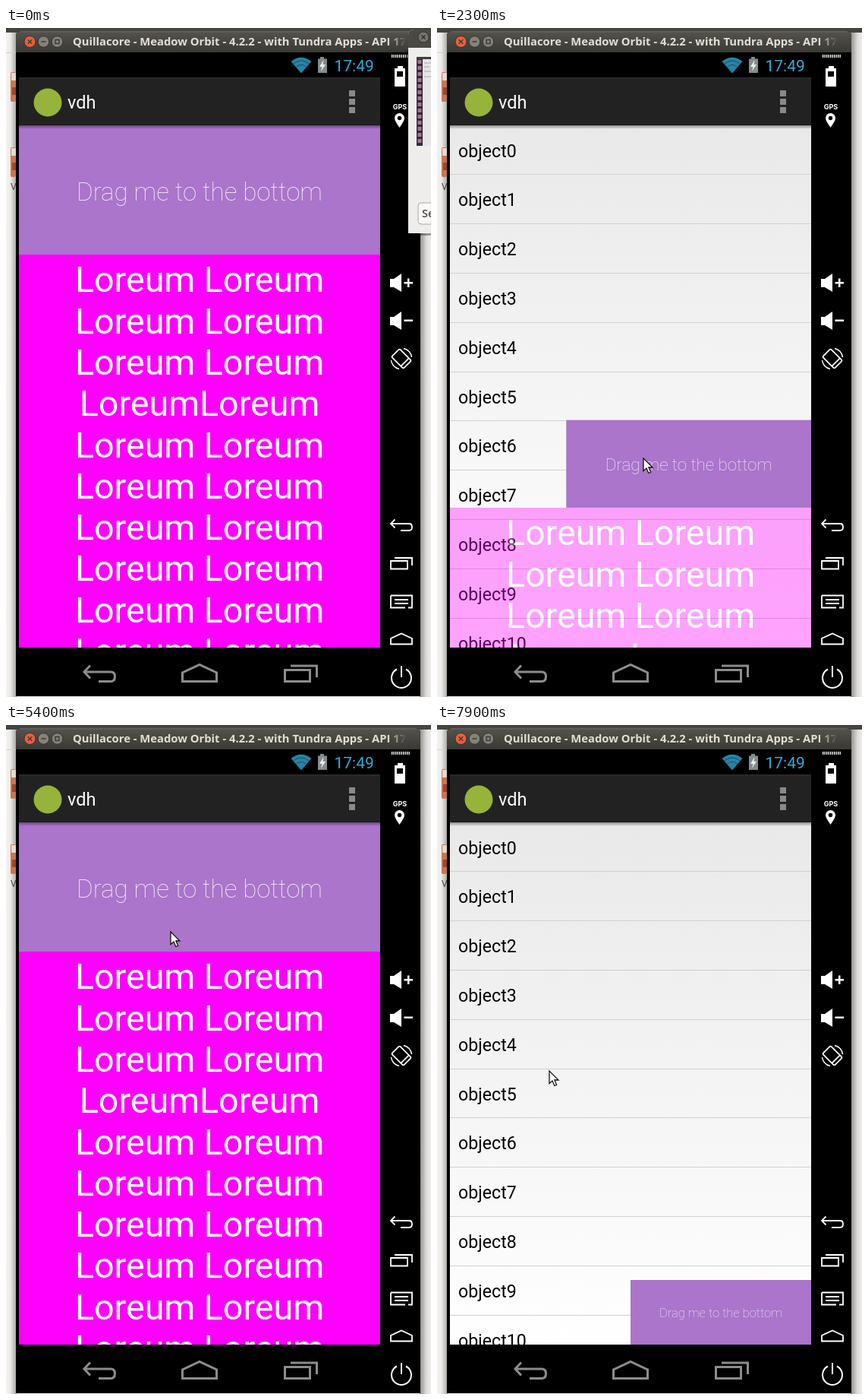
Recreate the animation shown at these times as an HTML page. Size 560 px wide and 880 px high, loop 8 s.

```html
<!DOCTYPE html>
<html lang="en">
<head>
<meta charset="utf-8">
<title>Drag panel demo</title>
<style>
  html, body { margin: 0; width: 100%; height: 100%; overflow: hidden; background: #f2f1ef; }
  svg { display: block; width: 560px; height: 880px; }
  text { font-family: Roboto, "Noto Sans", sans-serif; }
  .title { font: 700 14.8px "Open Sans", "Noto Sans", sans-serif; }
  .button { font: 600 14.5px "Open Sans", "Noto Sans", sans-serif; fill: #4c4c4c; }
  .gps { font: 700 9px Inter, "Liberation Sans", sans-serif; fill: #fff; text-anchor: middle; }
  .row { font-size: 23.2px; fill: #050505; }
  .lorem { font-size: 46.6px; fill: #fff; text-anchor: middle; }
  .drag { font-size: 33.1px; font-weight: 100; fill: #f7effb; text-anchor: middle; }
  .side { fill: none; stroke: #fff; stroke-width: 1.8; }
  .nav { fill: none; stroke: #8c8c8c; stroke-width: 3; }
</style>
</head>
<body>
<svg viewBox="0 0 560 880">
  <defs>
    <linearGradient id="bar" x2="0" y2="1"><stop stop-color="#55534d"/><stop offset="1" stop-color="#3a3934"/></linearGradient>
    <linearGradient id="sheet" x2="0" y2="1"><stop stop-color="#e9e9e9"/><stop offset=".5" stop-color="#f4f4f4"/><stop offset="1" stop-color="#fff"/></linearGradient>
    <linearGradient id="drop" x2="0" y2="1"><stop stop-opacity=".4"/><stop offset="1" stop-opacity="0"/></linearGradient>
    <linearGradient id="left"><stop stop-color="#f4f3f1"/><stop offset=".4" stop-color="#ecebe9"/><stop offset="1" stop-color="#a5a4a1"/></linearGradient>
    <linearGradient id="right"><stop stop-color="#8f8e8b"/><stop offset=".6" stop-color="#dddcda"/><stop offset="1" stop-color="#efeeec"/></linearGradient>
    <linearGradient id="fade" gradientUnits="userSpaceOnUse" x1="503" x2="527"><stop stop-color="#e2ded6"/><stop offset="1" stop-color="#e2ded6" stop-opacity="0"/></linearGradient>
    <clipPath id="screen"><path d="M17 128H493V815H17Z"/></clipPath>
  </defs>

  <!-- desktop -->
  <rect width="14" height="880" fill="url(#left)"/>
  <rect x="545" width="15" height="880" fill="url(#right)"/>
  <rect width="560" height="6" fill="#45443f"/>
  <path d="M0 32.5H13" stroke="#d0cecb"/>
  <g id="files"></g>
  <text x="6" y="213" font-size="12" fill="#444">V</text>

  <!-- emulator window -->
  <path d="M13 879V11Q13 4 20 4H539Q546 4 546 11V879Z"/>
  <path d="M13 32V11Q13 4 20 4H539Q546 4 546 11V32Z" fill="url(#bar)"/>
  <path d="M18 5H541" stroke="#6b6963"/>
  <circle cx="31.5" cy="18" r="7.5" fill="#e8603c" stroke="#33322e"/>
  <g fill="#85827a" stroke="#33322e"><circle cx="49.5" cy="18" r="7.3"/><circle cx="67.5" cy="18" r="7.3"/></g>
  <path d="M28.7 15.2L34.3 20.8M34.3 15.2L28.7 20.8M46.5 18H52.5M65 15.5H70V20.5H65Z" fill="none" stroke="#3a3934" stroke-width="1.4"/>
  <text class="title" x="88" y="23" fill="url(#fade)">Quillacore - Meadow Orbit - 4.2.2 - with Tundra Apps - API 17</text>

  <!-- status bar -->
  <path d="M375.5 44Q389 33.5 402.5 44L389 59.5Z" fill="#2783a6"/>
  <path d="M379 47Q389 39 399 47M382.5 51Q389 46 395.5 51" fill="none" stroke="#125168"/>
  <path d="M414 38H419V40.5H423V59H411V40.5H414Z" fill="#858b8d"/>
  <path d="M418.5 42L413 51H416.5L415 57L421 48H417.5Z" fill="#e9eeee"/>
  <text x="432.5" y="56.5" font-size="21" fill="#36a9d4">17:49</text>

  <!-- device controls -->
  <path d="M508 37H532" stroke="#fff" stroke-width="4" stroke-dasharray="1.3 1.2"/>
  <path d="M516 50H523V53H526V77H512V53H516Z" fill="#fff"/>
  <path d="M515 57H523V64H515Z"/>
  <text class="gps" x="519" y="107">GPS</text>
  <path d="M518.5 131Q512 122 512 118.5A6.5 6.5 0 0 1 525 118.5Q525 122 518.5 131Z" fill="#fff"/>
  <circle cx="518.5" cy="118.5" r="2.7"/>
  <g fill="#fff">
    <path id="spk" d="M506 330H511L521 323V347L511 341H506Z"/>
    <use href="#spk" y="50"/>
    <path d="M524.5 334H529V329.5H531.5V334H536V336.5H531.5V341H529V336.5H524.5ZM524.5 383.5H536V386H524.5Z"/>
  </g>
  <g class="side">
    <g transform="rotate(-45 521 435)"><rect x="513.5" y="424" width="15" height="22" rx="2"/><path d="M513.5 441.5H528.5"/></g>
    <path d="M524 421.5A13.5 13.5 0 0 1 534.5 433M518 448.5A13.5 13.5 0 0 1 507.500 437" stroke-width="1.5"/>
    <path d="M512.5 646.5L507 652L512.5 657.5M507 652H531Q535 652 535 656.5Q535 661 531 661H520"/>
    <path d="M507 701H529V711.5H507ZM512 697H535V707"/>
    <path d="M507 746.5H535V762.5H530M507 746.5V762.5H526M512 752H530M512 757H530"/>
    <path d="M507 810.5V803L521 796.5L535 803V810.5Z"/>
    <path d="M515 843.5A13 13 0 1 0 527 843.5M521 839V854" stroke-width="2"/>
  </g>

  <!-- app bar -->
  <path d="M17 65H493V128H17Z" fill="#222"/>
  <path d="M17 66H493" stroke="#303030"/>
  <path d="M17 127.5H493" stroke="#151515"/>
  <circle cx="55" cy="98" r="18.5" fill="#96b43a"/>
  <text x="81" y="106" font-size="23.6" fill="#fff">vdh</text>
  <path d="M452 82H460V90H452ZM452 93H460V101H452ZM452 104H460V112H452Z" fill="#898989"/>

  <!-- app content -->
  <g clip-path="url(#screen)">
    <rect x="17" y="128" width="476" height="687" fill="url(#sheet)"/>
    <g id="rows"></g>
    <g id="header">
      <rect x="-476" y="-170" width="476" height="170" fill="#aa75ca"/>
      <text class="drag" x="-238" y="-71.5">Drag me to the bottom</text>
    </g>
    <g id="desc">
      <rect x="17" width="476" height="687" fill="#f0f"/>
    </g>
    <rect x="17" y="128" width="476" height="5" fill="url(#drop)"/>
  </g>

  <!-- navigation bar -->
  <g class="nav">
    <path d="M111 838.5L103 847L111 855.5M103 847H138Q143.5 847 143.5 853Q143.5 859.5 138 859.5H122"/>
    <path d="M232.5 859.5V848L255 837.5L277.5 848V859.5Z"/>
    <path d="M367.5 844.5H400.5V859.5H367.5ZM375 839H409.5V854"/>
  </g>

  <!-- dialog at the edge -->
  <g id="dialog">
    <path d="M527 30H530V273H560V270H530" fill="#000" opacity=".35"/>
    <path d="M530 270V10Q530 2 538 2H560V270Z" fill="#eeedeb"/>
    <path d="M530 26V10Q530 2 538 2H560V26Z" fill="#4a4944"/>
    <circle cx="550" cy="12" r="7" fill="#77746d" stroke="#33322e"/>
    <path d="M547.5 9.5L552.5 14.5M552.5 9.5L547.5 14.5" stroke="#33322e" stroke-width="1.4"/>
    <path d="M541 38H560V155H541Z" fill="#e6e4e6"/>
    <path d="M541 38H549V155H541Z" fill="#3b2340"/>
    <path d="M545 42V152" stroke="#a0798c" stroke-width="5" stroke-dasharray="5 3"/>
    <path d="M541 39.5H560" stroke="#403d3b" stroke-width="3"/>
    <path d="M551 46H560M551 51H558M551 57H560M551 64H560" stroke="#aaa"/>
    <path d="M560 230H547Q543 230 543 234V254Q543 258 547 258H560" fill="#f8f7f6" stroke="#aaa7a2"/>
    <text class="button" x="548" y="249">Se</text>
  </g>

  <path id="cursor" d="M0 0V16.5L4 13L6.8 19.5L9.6 18.3L6.9 12H12Z" fill="#fff" stroke="#111" stroke-width="1.3"/>
</svg>

<script>
const LOOP = 8000, STEP = 100, TRAVEL = 517;
const $ = id => document.getElementById(id);

function add(parent, tag, attrs, label = '') {
  const el = document.createElementNS('http://www.w3.org/2000/svg', tag);
  for (const key in attrs) el.setAttribute(key, attrs[key]);
  el.textContent = label;
  $(parent).append(el);
}

for (const y of [58, 157]) {
  add('files', 'rect', { x: 6, y, width: 7, height: 39, rx: 2, fill: '#c9764f' });
  add('files', 'rect', { x: 7, y: y + 1, width: 6, height: 10, fill: '#e4d9d0' });
  add('files', 'rect', { x: 8, y: y + 20, width: 5, height: 10, fill: '#9d4526' });
}
for (let i = 0; i < 11; i++) {
  const y = 64.8 * i;
  add('rows', 'text', { class: 'row', x: 28, y: 169.5 + y }, 'object' + i);
  add('rows', 'rect', { x: 17, y: Math.round(192.4 + y), width: 476, height: 1, fill: '#d0d1d0' });
}
for (let i = 0; i < 12; i++) {
  add('desc', 'text', { class: 'lorem', x: 255, y: 49.3 + 54.3 * i }, i === 3 ? 'LoreumLoreum' : 'Loreum Loreum');
}

// Keys: time, value(s)
const dragKeys = [[1500, 0], [1800, .236], [2300, .644], [2800, 1], [4100, 1], [5300, 0]];
const cursorKeys = [
  [500, 575, 260], [1100, 257, 247], [1500, 257, 247], [1800, 263, 369], [2300, 272, 566],
  [2800, 291, 766], [4100, 291, 766], [5300, 217, 272], [5400, 217, 272],
  [6400, 217, 283], [7300, 217, 283], [7900, 148, 455]
];

function track(keys, t) {
  const next = keys.findIndex(k => k[0] > t);
  if (next === 0) return keys[0].slice(1);
  if (next < 0) return keys[keys.length - 1].slice(1);
  const a = keys[next - 1], b = keys[next];
  const u = (t - a[0]) / (b[0] - a[0]);
  return a.slice(1).map((v, i) => v + (b[i + 1] - v) * u);
}

// Quintic ease-out of the automatic slide
function settle(t) {
  const u = Math.min(1, Math.max(0, (t - 6890) / 785));
  return 1 - (1 - u) ** 5;
}

function draw(t) {
  const auto = t > 6000;
  const p = auto ? settle(t) : track(dragKeys, t)[0];
  const q = auto ? settle(t - 25) : p; // the text panel trails the slide
  const [x, y] = track(cursorKeys, t);
  $('header').setAttribute('transform', `translate(493 ${298 + TRAVEL * p}) scale(${1 - p / 2})`);
  $('desc').setAttribute('transform', `translate(0 ${298 + TRAVEL * q})`);
  $('desc').setAttribute('opacity', 1 - p);
  $('cursor').setAttribute('transform', `translate(${x} ${y})`);
  $('dialog').setAttribute('visibility', t < 100 ? 'visible' : 'hidden');
}

function tick() {
  const t = performance.now() % LOOP;
  draw(Math.floor(t / STEP) * STEP);
  requestAnimationFrame(tick);
}
tick();
</script>
</body>
</html>
```
